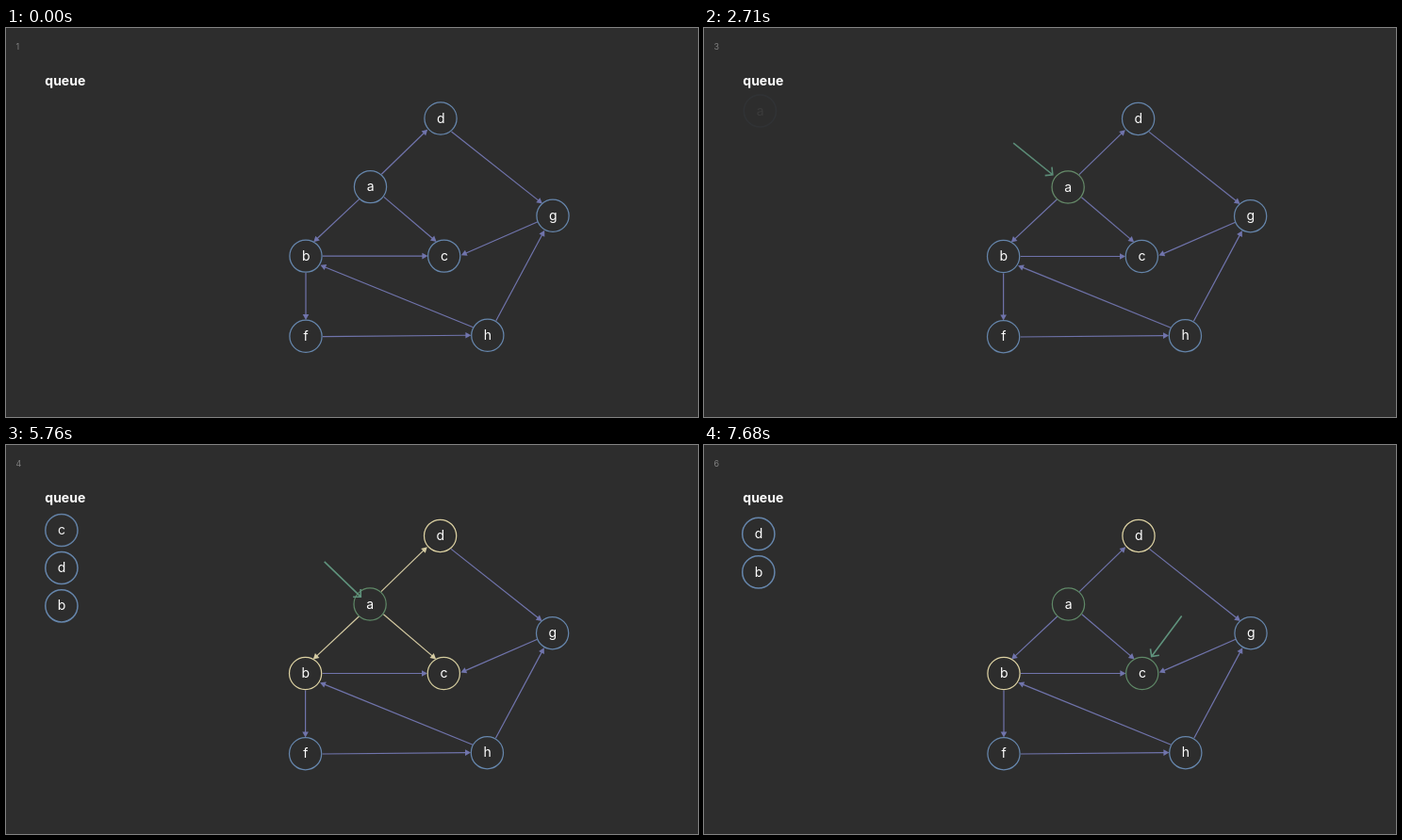
An HTML page with a canvas that plays this animation: 734 px wide and 413 px high, repeating every 8 s.

```html
<!DOCTYPE html>
<html lang="en">
<head>
<meta charset="utf-8">
<title>Graph traversal queue</title>
<style>
  html, body { margin: 0; width: 100%; height: 100%; overflow: hidden; background: #2d2d2d; }
  canvas { display: block; width: 734px; height: 413px; }
</style>
</head>
<body>
<canvas id="stage"></canvas>
<script>
const W = 734, H = 413, LOOP = 8000;
const BG = '#2d2d2d', BLUE = '#6686ac', PURPLE = '#7074ac', YELLOW = '#dcd1a2',
      GREEN = '#5f8867', POINTER = '#5f927c', WHITE = '#ffffff';

const nodes = {
  a: [386.5, 168.6], b: [318, 242.1], c: [464.7, 242.1], d: [461, 96],
  f: [318, 327.3], g: [580, 199.3], h: [510.8, 326.3]
};

// name, start x, start y, tip x, tip y
const edges = [
  ['ad', 398.3, 155.2, 447.2, 107.8],
  ['ab', 375, 181.4, 326.2, 227.2],
  ['ac', 400.8, 179.4, 456.6, 227],
  ['dg', 472.5, 110, 569, 186.5],
  ['gc', 564, 205.8, 482.8, 241.2],
  ['bc', 336, 242.1, 447.4, 242.1],
  ['bf', 318, 260, 318, 310],
  ['fh', 336, 327.6, 493.4, 326.2],
  ['hb', 495.5, 317.8, 333.4, 251.8],
  ['hg', 519.8, 310.8, 571.2, 214.8]
];

const atA = { x: 349, y: 138.9, angle: 0.68 };
const atC = { x: 490.3, y: 202.6, angle: 2.21 };

const slides = [
  { num: 1, queue: {}, shift: [0, 0] },
  { num: 2, queue: { a: [59.4, 88] }, yellow: 'a', shift: [0, 0] },
  { num: 3, queue: {}, green: 'a', pointer: atA, shift: [-0.4, 0.4] },
  { num: 4, queue: { c: [58.9, 90.5], d: [58.9, 130.5], b: [58.9, 170.8] },
    yellow: 'bcd', green: 'a', lit: 'a', pointer: atA, shift: [-0.4, 0.4] },
  { num: 5, queue: { d: [58.9, 130.5], b: [58.9, 170.8] },
    yellow: 'bd', green: 'ac', pointer: atC, shift: [-0.4, 0.4] },
  { num: 6, queue: { d: [57.8, 94.4], b: [57.8, 134.9] },
    yellow: 'bd', green: 'ac', pointer: { ...atC, x: 490.7, y: 203 }, shift: [0, 0.4] }
];

// Transition i leads from slide i to slide i + 1.
const changes = [
  { from: 500, last: 960, settle: 1730, steps: 8 },
  { from: 2260, last: 2710, settle: 3450, steps: 8 },
  { from: 3990, last: 4450, settle: 5220, steps: 8 },
  { from: 5760, last: 6780, settle: 6780, steps: 18, move: true },
  { from: 6940, last: 7680, settle: 7680, steps: 13, move: true }
];

const makeContext = canvas => {
  const scale = window.devicePixelRatio || 1;
  canvas.width = Math.round(W * scale);
  canvas.height = Math.round(H * scale);
  const c = canvas.getContext('2d');
  c.scale(scale, scale);
  return c;
};
const main = makeContext(document.getElementById('stage'));
const layer = makeContext(document.createElement('canvas'));

const mix = (a, b, p) => a + (b - a) * p;
const has = (set, key) => (set || '').includes(key);

function label(c, text, x, y, font, color, align = 'left') {
  c.font = font + ' Inter, sans-serif';
  c.fillStyle = color;
  c.textAlign = align;
  c.fillText(text, x, y);
}

function drawNode(c, name, x, y, color, width) {
  c.strokeStyle = color;
  c.lineWidth = width;
  c.beginPath();
  c.arc(x, y, 17.1, 0, Math.PI * 2);
  c.stroke();
  label(c, name, x + 0.2, y + 4.6, '14px', WHITE, 'center');
}

function drawEdge(c, x1, y1, x2, y2, color) {
  const len = Math.hypot(x2 - x1, y2 - y1);
  c.save();
  c.translate(x1, y1);
  c.rotate(Math.atan2(y2 - y1, x2 - x1));
  c.strokeStyle = c.fillStyle = color;
  c.lineWidth = 1.2;
  c.beginPath();
  c.moveTo(0, 0);
  c.lineTo(len - 5, 0);
  c.stroke();
  c.beginPath();
  c.moveTo(len, 0);
  c.lineTo(len - 6, -3.3);
  c.lineTo(len - 6, 3.3);
  c.fill();
  c.restore();
}

function drawPointer(c, { x, y, angle }) {
  const half = 26.8, wing = 5.8;
  c.save();
  c.translate(x, y);
  c.rotate(angle);
  c.strokeStyle = POINTER;
  c.lineWidth = 1.6;
  c.beginPath();
  c.moveTo(-half, 0);
  c.lineTo(half, 0);
  c.moveTo(half - wing, -wing);
  c.lineTo(half, 0);
  c.lineTo(half - wing, wing);
  c.stroke();
  c.restore();
}

function drawSlide(c, s) {
  c.fillStyle = BG;
  c.fillRect(0, 0, W, H);
  label(c, s.num, 10.6, 23.3, '9px', '#828282');
  label(c, 'queue', 41.3, 60.6 + s.shift[1], 'bold 14px', WHITE);
  for (const [name, [x, y]] of Object.entries(s.queue)) drawNode(c, name, x, y, BLUE, 1.5);

  c.save();
  c.translate(...s.shift);
  for (const [name, ...line] of edges)
    drawEdge(c, ...line, s.lit === name[0] ? YELLOW : PURPLE);
  for (const [name, [x, y]] of Object.entries(nodes)) {
    const color = has(s.yellow, name) ? YELLOW : has(s.green, name) ? GREEN : BLUE;
    drawNode(c, name, x, y, color, 1.25);
  }
  c.restore();
  if (s.pointer) drawPointer(c, s.pointer);
}

function progress(ch, t) {
  if (t >= ch.settle) return 1;
  const gap = (ch.last - ch.from) / (ch.steps - 1);
  const step = Math.min(ch.steps - 1, Math.floor((t - ch.from) / gap + 0.01));
  if (ch.move) return 1 - (1 - (20 + step * gap) / 1040) ** 3;
  return (25 + step * gap) / 510;
}

// Give both slides the same in-between places for the parts they share.
function align(a, b, p) {
  const pointer = {}, queueA = { ...a.queue }, queueB = { ...b.queue };
  for (const key of ['x', 'y', 'angle']) pointer[key] = mix(a.pointer[key], b.pointer[key], p);
  for (const name in queueB)
    queueA[name] = queueB[name] = a.queue[name].map((v, i) => mix(v, b.queue[name][i], p));
  const shift = a.shift.map((v, i) => mix(v, b.shift[i], p));
  return [{ ...a, pointer, shift, queue: queueA }, { ...b, pointer, shift, queue: queueB }];
}

function render(t) {
  const i = changes.findLastIndex(ch => t >= ch.from);
  if (i < 0) return drawSlide(main, slides[0]);
  const p = progress(changes[i], t);
  let a = slides[i], b = slides[i + 1];
  if (p === 1) return drawSlide(main, b);
  if (changes[i].move) [a, b] = align(a, b, p);
  drawSlide(main, a);
  drawSlide(layer, b);
  main.globalAlpha = p;
  main.drawImage(layer.canvas, 0, 0, W, H);
  main.globalAlpha = 1;
}

const began = performance.now();
function frame() {
  render((performance.now() - began) % LOOP);
  requestAnimationFrame(frame);
}
frame();
</script>
</body>
</html>
```
